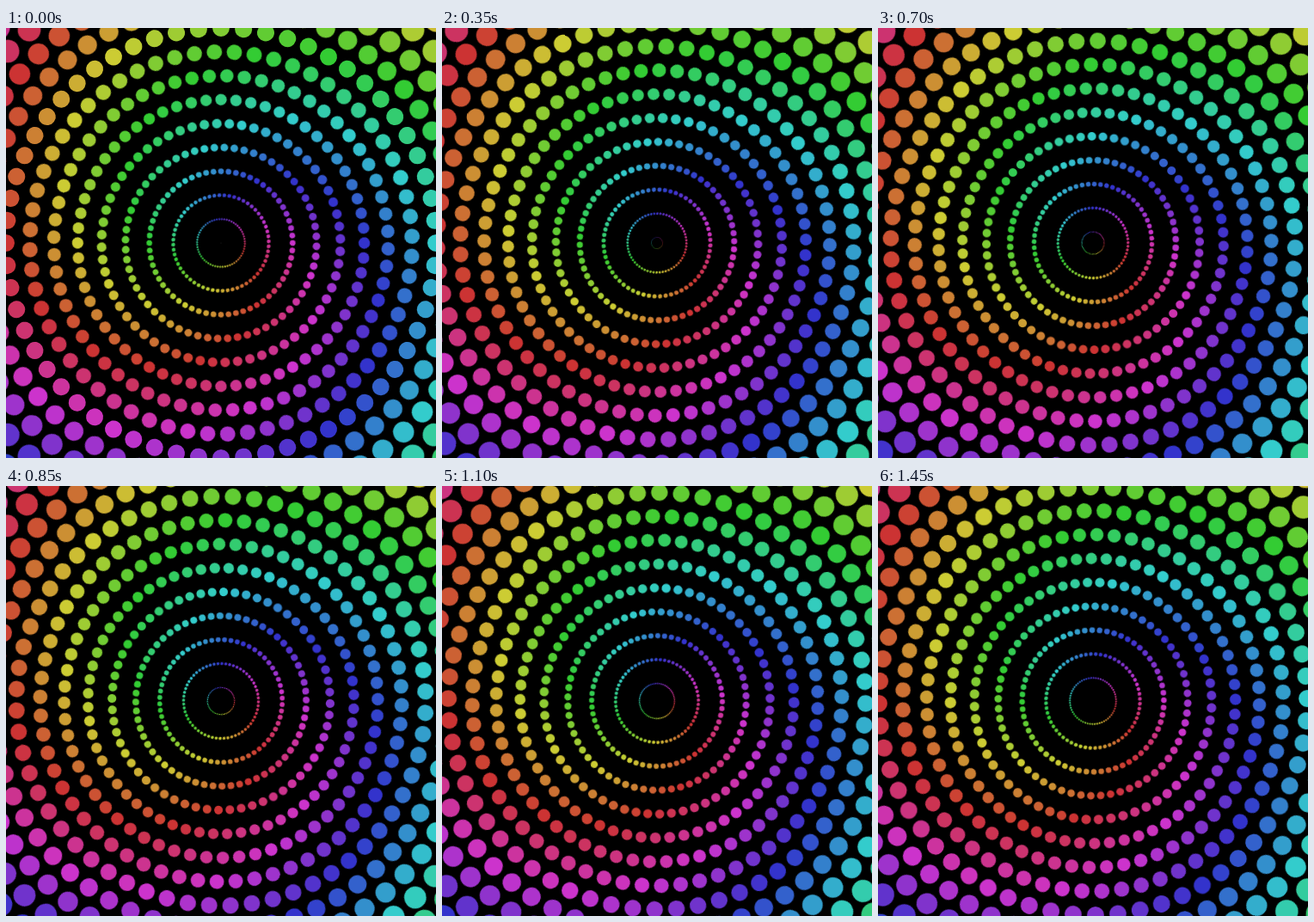
Animation of 500x500 px, one loop 1.5 s. Source, as an HTML page without scripts:

```html
<!DOCTYPE html>
<html lang="en">
<head>
<meta charset="utf-8">
<title>Rainbow dot tunnel</title>
<style>
  html, body { margin: 0; width: 100%; height: 100%; overflow: hidden; background: #000; }
  svg { display: block; width: 100%; height: 100%; }

  /* 60 dots per ring: --a picks a sector, --b a dot inside it */
  .dot {
    --turn: calc((var(--a) + var(--b)) * 6deg);
    transform: rotate(var(--turn));
    fill: hsl(var(--turn), 60%, 50%);
  }

  /* Each loop moves a ring one place outwards and turns it by 20 degrees */
  .ring { animation: grow 1.5s steps(30) infinite; }
  @keyframes grow {
    from { transform: rotate(calc(var(--k) * 20deg)) scale(var(--k)); }
    to { transform: rotate(calc((var(--k) + 1) * 20deg)) scale(calc(var(--k) + 1)); }
  }

  .speck { fill: #222; animation: blink 1.5s steps(1) infinite; }
  @keyframes blink {
    0% { opacity: 1; }
    3.333% { opacity: 0; }
  }
</style>
</head>
<body>
<svg viewBox="0 0 500 500">
  <defs>
    <circle id="dot" cx="27.778" r="1.111"/>
    <g id="sector">
      <use href="#dot" class="dot" style="--b:0"/>
      <use href="#dot" class="dot" style="--b:1"/>
      <use href="#dot" class="dot" style="--b:2"/>
      <use href="#dot" class="dot" style="--b:3"/>
      <use href="#dot" class="dot" style="--b:4"/>
      <use href="#dot" class="dot" style="--b:5"/>
      <use href="#dot" class="dot" style="--b:6"/>
      <use href="#dot" class="dot" style="--b:7"/>
      <use href="#dot" class="dot" style="--b:8"/>
      <use href="#dot" class="dot" style="--b:9"/>
    </g>
    <g id="ring">
      <use href="#sector" style="--a:0"/>
      <use href="#sector" style="--a:10"/>
      <use href="#sector" style="--a:20"/>
      <use href="#sector" style="--a:30"/>
      <use href="#sector" style="--a:40"/>
      <use href="#sector" style="--a:50"/>
    </g>
  </defs>
  <g transform="translate(250 250)">
    <circle class="speck" r=".6"/>
    <g class="ring" style="--k:0"><use href="#ring"/></g>
    <g class="ring" style="--k:1"><use href="#ring"/></g>
    <g class="ring" style="--k:2"><use href="#ring"/></g>
    <g class="ring" style="--k:3"><use href="#ring"/></g>
    <g class="ring" style="--k:4"><use href="#ring"/></g>
    <g class="ring" style="--k:5"><use href="#ring"/></g>
    <g class="ring" style="--k:6"><use href="#ring"/></g>
    <g class="ring" style="--k:7"><use href="#ring"/></g>
    <g class="ring" style="--k:8"><use href="#ring"/></g>
    <g class="ring" style="--k:9"><use href="#ring"/></g>
    <g class="ring" style="--k:10"><use href="#ring"/></g>
    <g class="ring" style="--k:11"><use href="#ring"/></g>
    <g class="ring" style="--k:12"><use href="#ring"/></g>
    <g class="ring" style="--k:13"><use href="#ring"/></g>
  </g>
</svg>
</body>
</html>
```
